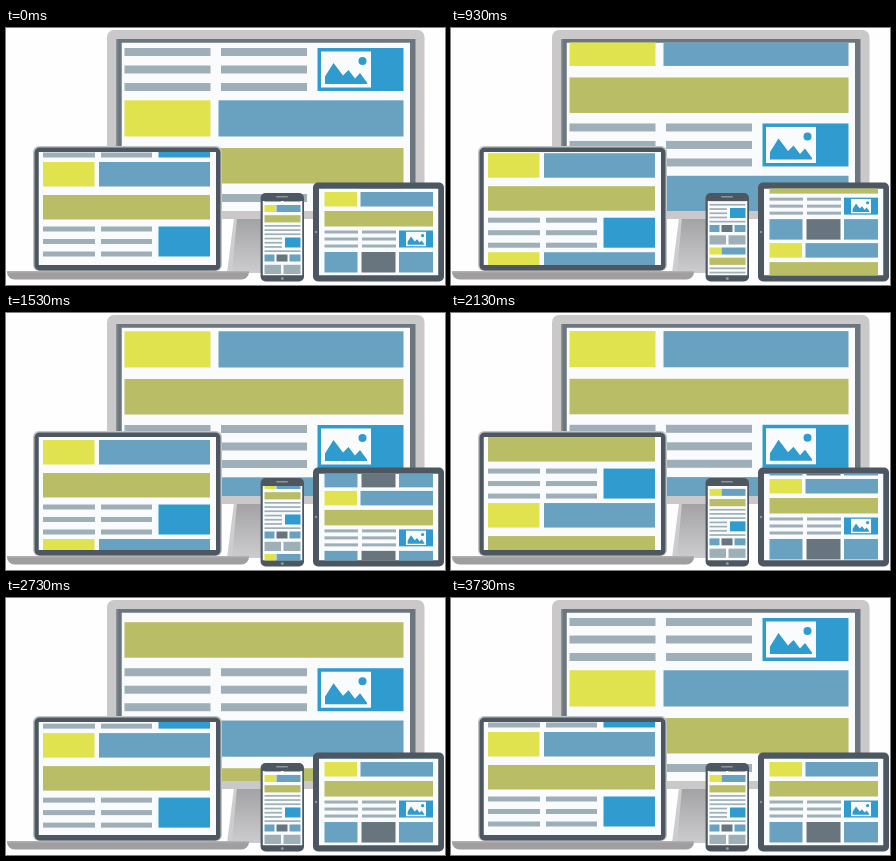
An HTML page with a canvas for the animation above (4.07 s loop, 439x257 px).

```html
<!DOCTYPE html>
<html lang="en">
<head>
<meta charset="utf-8">
<title>Responsive devices</title>
<style>
  html, body { margin: 0; width: 100%; height: 100%; overflow: hidden; background: #fefefe; }
  canvas { display: block; width: 439px; height: 257px; }
</style>
</head>
<body>
<canvas id="stage" width="439" height="257"></canvas>
<script>
const ctx = document.getElementById('stage').getContext('2d');
const LOOP = 4070, FPS = 15;
const YELLOW = '#e0e34d', BLUE = '#68a2c0', OLIVE = '#b9bd65', LINE = '#9fafb7',
  BRIGHT = '#309bce', SLATE = '#68757f', PAPER = '#f9fbfd', DARK = '#4d5761';

const progress = (t, start, end) => Math.min(1, Math.max(0, (t - start) / (end - start)));

// Cubic bezier easing with end handles at (x1, 0) and (x2, 1).
function bezier(u, x1, x2) {
  let lo = 0, hi = 1, s = u;
  for (let i = 0; i < 24; i++) {
    s = (lo + hi) / 2;
    const r = 1 - s;
    if (3 * x1 * s * r * r + 3 * x2 * s * s * r + s * s * s < u) lo = s; else hi = s;
  }
  return s * s * (3 - 2 * s);
}
const glide = (t, start, end, x1 = 1 / 3, x2 = 2 / 3) => bezier(progress(t, start, end), x1, x2);
const flick = (t, start, end) => 1 - (1 - progress(t, start, end)) ** 4;

// Quick pull followed by a slow return, shared by the two small devices.
const swipe = t => glide(t, 500, 800) - flick(t, 800, 3090);

// Every device scrolls away from its resting place and back again.
const scroll = {
  monitor: t => 92 * (glide(t, 30, 1350, 0.5, 0.5) - glide(t, 2090, 3733, 0.32, 0.46)),
  laptop: t => 92 * (flick(t, 0, 1490) - glide(t, 1630, 2810)),
  tablet: t => 65 * swipe(t),
  phone: t => -37.5 * swipe(t)
};

function box(x1, y1, x2, y2, color) {
  ctx.fillStyle = color;
  ctx.fillRect(x1, y1, x2 - x1, y2 - y1);
}

function round(x1, y1, x2, y2, r, color) {
  ctx.fillStyle = color;
  ctx.beginPath();
  ctx.roundRect(x1, y1, x2 - x1, y2 - y1, r);
  ctx.fill();
}

function poly(points, color) {
  ctx.fillStyle = color;
  ctx.beginPath();
  points.forEach(([x, y]) => ctx.lineTo(x, y));
  ctx.fill();
}

function disc(x, y, r, color) {
  ctx.fillStyle = color;
  ctx.beginPath();
  ctx.arc(x, y, r, 0, 2 * Math.PI);
  ctx.fill();
}

// Image placeholder: white card with mountains and a sun.
function picture(x, y, k) {
  ctx.save();
  ctx.translate(x, y);
  ctx.scale(k, k);
  box(0, 0, 50, 36, PAPER);
  poly([[4, 32.5], [4, 25], [12.5, 11.5], [22, 24], [27.5, 18.5], [34, 27], [39, 21.5], [46, 31], [46, 32.5]], BRIGHT);
  disc(41.5, 9.5, 4, BRIGHT);
  ctx.restore();
}

function rows(x1, x2, y, count, step, height) {
  for (let i = 0; i < count; i++) box(x1, y + i * step, x2, y + i * step + height, LINE);
}

function monitorPage(y) {
  rows(118.5, 204.5, y + 20, 3, 17.5, 8);
  rows(215, 301, y + 20, 3, 17.5, 8);
  box(311.5, y + 20, 397.5, y + 63, BRIGHT);
  picture(315, y + 23.5, 1);
  box(118.5, y + 72.3, 204.5, y + 108.5, YELLOW);
  box(212.5, y + 72.3, 397.5, y + 108.5, BLUE);
  box(118.5, y + 120, 397.5, y + 155.5, OLIVE);
}

function laptopPage(y) {
  box(37, y + 134, 88.5, y + 158.5, YELLOW);
  box(93, y + 134, 204, y + 158.5, BLUE);
  box(37, y + 167, 204, y + 191.5, OLIVE);
  rows(37, 89, y + 198.5, 3, 12.5, 5);
  rows(95, 146, y + 198.5, 3, 12.5, 5);
  box(152.5, y + 198.5, 204, y + 228.5, BRIGHT);
}

function tabletPage(y) {
  box(318.5, y + 164, 351, y + 178.5, YELLOW);
  box(354.5, y + 164, 427, y + 178.5, BLUE);
  box(318.5, y + 183, 427, y + 198.5, OLIVE);
  rows(318.5, 352, y + 202.5, 3, 7, 3);
  rows(356, 390, y + 202.5, 3, 7, 3);
  box(393, y + 202.5, 427, y + 219.5, BRIGHT);
  picture(400, y + 203.8, 0.4);
  box(318.5, y + 224, 351.5, y + 244.5, BLUE);
  box(355.5, y + 224, 389.5, y + 244.5, SLATE);
  box(393, y + 224, 427, y + 244.5, BLUE);
}

function phonePage(y) {
  box(258.5, y + 177, 270, y + 184, YELLOW);
  box(270.5, y + 177, 294.5, y + 184, BLUE);
  box(258.5, y + 187.2, 294.5, y + 194.4, OLIVE);
  rows(258.5, 294.5, y + 197, 3, 4.2, 1.7);
  rows(258.5, 276, y + 209.7, 3, 4.2, 1.7);
  box(279, y + 209.5, 294.5, y + 219.5, BRIGHT);
  rows(258.5, 294.5, y + 222.3, 1, 0, 1.7);
  box(258.5, y + 226.5, 268.5, y + 233.5, BLUE);
  box(270.5, y + 226.5, 281.5, y + 233.5, SLATE);
  box(283.5, y + 226.5, 294.5, y + 233.5, BLUE);
  box(258.5, y + 236.8, 275, y + 246, LINE);
  box(277.5, y + 236.8, 294.5, y + 246, LINE);
}

// Stacks page sections inside a clipped screen, with `below` more under the resting one.
function screen(x1, y1, x2, y2, page, height, below, offset) {
  ctx.save();
  ctx.beginPath();
  ctx.rect(x1, y1, x2 - x1, y2 - y1);
  ctx.clip();
  box(x1, y1, x2, y2, PAPER);
  for (let i = -1; i <= below; i++) page(offset + i * height);
  ctx.restore();
}

function drawMonitor(t) {
  const shade = ctx.createLinearGradient(0, 190, 0, 246);
  shade.addColorStop(0, '#a2a2a4');
  shade.addColorStop(0.5, '#b8b8ba');
  shade.addColorStop(1, '#cdcdcf');
  poly([[228, 190], [292, 190], [298, 245], [221, 245]], '#cdcdcf');
  poly([[231, 190], [290, 190], [296, 245], [226, 245]], shade);
  round(101, 2, 418.5, 191, 7, '#cac8c9');
  box(110, 11, 409.5, 183, '#6c767e');
  box(110, 11, 111.5, 183, '#8b9297');
  screen(115.5, 14.5, 404, 183, monitorPage, 146, 1, scroll.monitor(t));
}

function drawLaptop(t) {
  round(27, 118, 216, 243, 6, '#c3c4c6');
  round(28.5, 119.5, 214.5, 242.5, 5, DARK);
  screen(32.5, 124, 210, 237, laptopPage, 99, 0, scroll.laptop(t));
  round(1, 243, 243, 251.5, [1, 1, 8, 8], '#a09e9f');
  box(1, 243, 243, 244.5, '#b2b0b1');
}

function drawPhone(t) {
  round(254.6, 165, 298, 253.5, 5, DARK);
  round(270, 168, 282, 169.6, 1, '#8d959b');
  screen(256.5, 173, 296.5, 247.5, phonePage, 72, 1, scroll.phone(t));
  disc(276.3, 250.4, 1.5, '#8d959b');
}

function drawTablet(t) {
  round(307, 154.5, 438, 253.5, 5, DARK);
  screen(313, 160.5, 432.5, 247.5, tabletPage, 84, 0, scroll.tablet(t));
  disc(310, 204, 1.2, '#8d959b');
}

function render(now) {
  const elapsed = now % LOOP;
  const t = Math.floor((elapsed + 4) * FPS / 1000) * 1000 / FPS;
  box(0, 0, 439, 257, '#fefefe');
  drawMonitor(t);
  drawLaptop(t);
  drawPhone(t);
  drawTablet(t);
}

let begin = null;
function tick(now) {
  if (begin === null) begin = now;
  render(now - begin);
  requestAnimationFrame(tick);
}
render(0);
requestAnimationFrame(tick);
</script>
</body>
</html>
```
